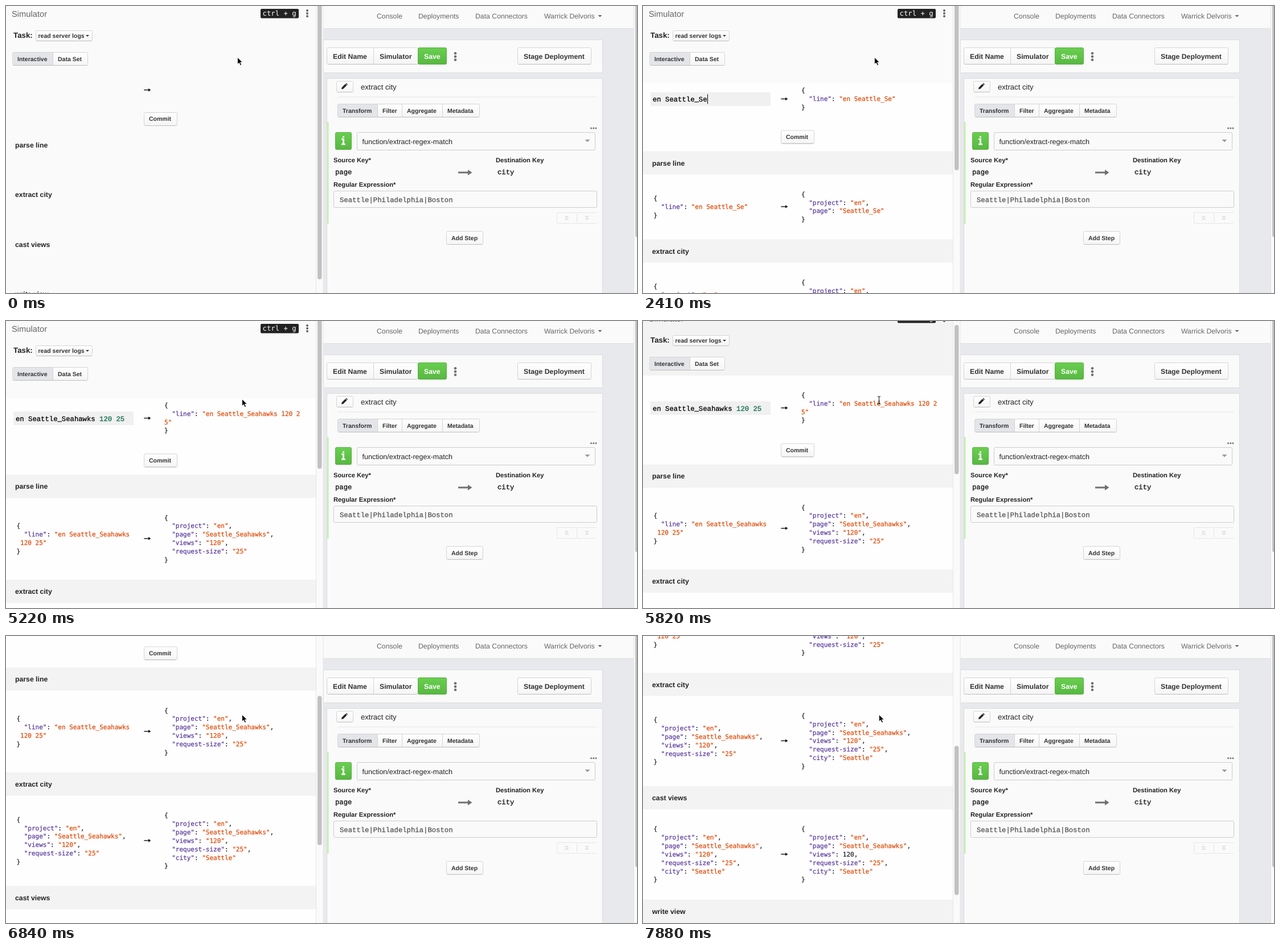
An HTML page for the animation above (8000 ms loop, 1108 by 505 pixels).

```html
<!DOCTYPE html>
<html lang="en">
<head>
<meta charset="utf-8">
<title>Simulator</title>
<style>
html, body { margin: 0; width: 100%; height: 100%; overflow: hidden; background: #fafafa; }
svg { display: block; width: 1108px; height: 505px; }
text { font-family: "Liberation Sans", Arial, sans-serif; white-space: pre; text-rendering: geometricPrecision; }
.b { font-weight: bold; }
.json { font: 11px "DejaVu Sans Mono", Menlo, monospace; stroke-width: .25px; }
.code { font: 12.25px "Liberation Mono", Courier, monospace; stroke-width: .3px; }
</style>
</head>
<body>
<svg id="stage" viewBox="0 0 1108 505">
  <defs>
    <clipPath id="paneClip"><rect width="545" height="505"/></clipPath>
    <linearGradient id="green" x2="0" y2="1">
      <stop stop-color="#69cf50"/><stop offset="1" stop-color="#58b742"/>
    </linearGradient>
    <linearGradient id="plain" x2="0" y2="1">
      <stop stop-color="#fff"/><stop offset="1" stop-color="#f5f5f5"/>
    </linearGradient>
  </defs>
  <g id="page"></g>
  <g id="pane" clip-path="url(#paneClip)"></g>
  <rect x="544.5" y="-1" width="12.5" height="507" fill="#fafafa" stroke="#e6e6e6"/>
  <rect id="thumb" x="547" width="7.5" rx="3.7" fill="#c1c1c1"/>
  <g id="mouse"></g>
</svg>
<script>
const LOOP = 8000, LINE = 14.85, INK = '#222', KEY = '#5b3b9e', STR = '#de4a08';
const $ = id => document.getElementById(id);

// [time, characters typed]
const TYPED = [[0, 0], [150, 1], [320, 2], [770, 3], [920, 4], [1070, 5], [1220, 7], [1370, 9],
  [1670, 10], [1820, 11], [2270, 12], [2410, 13], [2560, 14], [3010, 15], [3160, 16], [3310, 17],
  [3450, 19], [3600, 20], [3900, 21], [4050, 22], [4190, 23], [4630, 24], [4780, 25], [5080, 26]];
// [time, scroll offset]
const SCROLL = [[0, 0], [5370, 2], [5520, 5], [5660, 10], [5810, 18], [5960, 30], [6110, 48],
  [6250, 75], [6400, 108], [6550, 160], [6840, 215], [7140, 245], [7290, 272], [7580, 331], [7880, 390.5]];
const ENTRY = 'en Seattle_Seahawks 120 25';

const stepAt = (table, t) => table.filter(row => row[0] <= t).pop()[1];

const rect = (x, y, w, h, fill, extra = '') =>
  `<rect x="${x}" y="${y}" width="${w}" height="${h}" fill="${fill}" ${extra}/>`;
const text = (x, y, str, size, fill = '#333', cls = '') =>
  `<text x="${x}" y="${y}" font-size="${size}" fill="${fill}" class="${cls}">${str}</text>`;
const path = (d, fill, stroke = 'none', width = 1) =>
  `<path d="${d}" fill="${fill}" stroke="${stroke}" stroke-width="${width}"/>`;
const ink = color => `fill="${color}" stroke="${color}"`;
const mono = (x, y, str, color) =>
  `<text x="${x}" y="${y}" ${ink(color)} class="code">${str}</text>`;
const frame = (x, y, w, h, fill = 'url(#plain)', stroke = '#d4d4d4') =>
  rect(x + .5, y + .5, w, h, fill, `rx="2" stroke="${stroke}"`);
const button = (x, y, w, h) =>
  frame(x, y, w, h) + path(`M${x + 2} ${y + h + .5}h${w - 3}`, 'none', '#bdbdbd');
const caretDown = (x, y, w, fill) => path(`M${x} ${y}h${w}l${-w / 2} ${w / 2}z`, fill);
const dots = (x, y, dx, dy, r, fill) =>
  [-1, 0, 1].map(i => `<circle cx="${x + i * dx}" cy="${y + i * dy}" r="${r}" fill="${fill}"/>`).join('');
const arrow = y => path(`M242.3 ${y}h9`, 'none', '#111', 1.4) + path(`M250 ${y - 2.8}l4.4 2.8l-4.4 2.8z`, '#111');

function drawPage() {
  const label = (x, y, str) => text(x, y, str, 11.2, '#222', 'b');
  const chevrons = (x, y, d) =>
    path(`M${x - 3} ${y}l3 ${-3 * d}l3 ${3 * d}m-6 ${4 * d}l3 ${-3 * d}l3 ${3 * d}`, 'none', '#bbb');
  const tabs = [[591, 'Transform'], [661, 'Filter'], [704, 'Aggregate'], [775, 'Metadata']];
  const nav = [[651, 'Console'], [724, 'Deployments'], [824, 'Data Connectors'], [945, 'Warrick Delvoris']];
  $('page').innerHTML = [
    rect(557, 0, 551, 505, '#e8e9ed'),
    rect(557, 0, 546, 39, '#fafafa'),
    rect(557, 39, 546, 1, '#dfdfe1'),
    ...nav.map(([x, s]) => text(x, 22, s, 12.25, '#666')),
    caretDown(1039.5, 16, 7, '#666'),
    rect(557.5, 59.5, 490, 58, '#fafafa', 'stroke="#dcdcdf"'),
    rect(563.5, 127.5, 484, 400, '#fafafa', 'stroke="#dcdcdf"'),

    button(563, 73, 160, 29),
    rect(645, 74, 1, 28, '#d4d4d4'),
    text(574, 92.5, 'Edit Name', 12.25, '#333', 'b'),
    text(656, 92.5, 'Simulator', 12.25, '#333', 'b'),
    frame(723, 73, 50, 29, 'url(#green)', '#55b041'),
    text(734, 92.5, 'Save', 12.25, '#fff', 'b'),
    dots(789, 89, 0, 5.7, 2.3, '#707070'),
    button(898, 73, 129, 29),
    text(909, 92.5, 'Stage Deployment', 12.25, '#333', 'b'),

    button(580, 132, 29, 19),
    path('M589 146.5l.8-3.2l6.2-6.2l2.5 2.5l-6.2 6.2z', '#222'),
    path('M596.6 136.4l1-.9l2.4 2.4l-.9 1z', '#222'),
    text(623, 147, 'extract city', 13.1, '#222'),
    rect(583, 159.5, 454, 1, '#e8e8e8'),

    button(582, 172, 249, 23),
    rect(583, 173, 69, 22, '#e4e5e8'),
    ...[652, 695, 766].map(x => rect(x, 173, 1, 22, '#d4d4d4')),
    ...tabs.map(([x, s]) => text(x, 187.5, s, 10.5, '#333', 'b')),

    rect(564, 204, 2.7, 179, '#c6f3ae'),
    dots(1031.7, 215, 4.2, 0, 1.6, '#777'),
    frame(578, 222, 28, 30, 'url(#green)', '#55b041'),
    path('M589 233h5v9h2v2.5h-7v-2.5h2v-6.5h-2zM591 229h3v2.8h-3z', '#fff'),
    frame(616, 222, 418, 31, '#fafafa', '#ccc'),
    text(625.5, 242.5, 'function/extract-regex-match', 12.5, '#222'),
    caretDown(1016.5, 235, 9, '#999'),

    label(575, 275, 'Source Key*'),
    label(860, 275, 'Destination Key'),
    mono(578, 295.5, 'page', '#111'),
    mono(863, 295.5, 'city', '#111'),
    path('M794 293h19', 'none', '#707070', 3),
    path('M811 288l7.5 5l-7.5 5z', '#707070'),
    label(575, 317.5, 'Regular Expression*'),
    frame(575, 325, 462, 29, '#fafafa', '#ccc'),
    mono(586, 345, 'Seattle|Philadelphia|Boston', '#555'),

    frame(967, 363, 35, 19, '#fafafa', '#e6e6e6'),
    rect(1003, 363, 34, 1, '#e6e6e6') + rect(1003, 382, 34, 1, '#e6e6e6'),
    chevrons(984.5, 372.5, 1),
    chevrons(1020, 373, -1),
    button(773, 396, 64, 23),
    text(782, 411.8, 'Add Step', 10.5, '#333', 'b'),

    rect(1102.5, -1, 8, 508, '#fafafa', 'stroke="#e2e2e2"'),
    rect(1105, -8, 8, 415, '#c1c1c1', 'rx="3.7"')
  ].join('');
}

// Coloured runs for each line of an object, broken hard after max characters.
function jsonLines(obj, max) {
  const entries = Object.entries(obj);
  const rows = entries.map(([k, v], i) => [
    ['  ', INK], [`"${k}"`, KEY], [': ', INK],
    [JSON.stringify(v), typeof v === 'string' ? STR : INK],
    [i < entries.length - 1 ? ',' : '', INK]]);
  return [[['{', INK]], ...rows, [['}', INK]]].flatMap(row => {
    const chars = row.flatMap(([s, c]) => [...s].map(ch => [ch, c]));
    const lines = [];
    while (chars.length) lines.push(chars.splice(0, max));
    return lines;
  });
}

const jsonText = (lines, x, top) => lines.map((chars, i) => {
  let out = '', last = '';
  for (const [ch, c] of chars) {
    if (c !== last) out += (last && '</tspan>') + `<tspan ${ink(c)}>`;
    out += ch;
    last = c;
  }
  return `<text x="${x}" y="${top + i * LINE + 10.9}" class="json">${out}</tspan></text>`;
}).join('');

// Pipeline results for the typed line: [title, input, output] per step.
function runSteps(line) {
  const parsed = {};
  const names = ['project', 'page', 'views', 'request-size'];
  line.split(' ').filter(Boolean).forEach((w, i) => parsed[names[i]] = w);
  const hit = /Seattle|Philadelphia|Boston/.exec(parsed.page || '');
  const located = { ...parsed, city: hit && hit[0] };
  const cast = { ...located, views: Number(parsed.views) };
  return [
    ['parse line', line && { line }, parsed],
    ['extract city', parsed.page && parsed, located],
    ['cast views', parsed.views && located, cast],
    ['write view']
  ];
}

function thumbEnd(n) {
  if (!n) return 481;
  if (n < 4) return 417;
  if (n < 10) return 364;
  if (n < 21) return 289;
  return n < 25 ? 275 : 260;
}

function drawPane(n, scroll) {
  const line = ENTRY.slice(0, n);
  const pointY = 138 + scroll;
  let overText = false;
  const output = (lines, top) => {
    const row = lines[Math.floor((pointY - top) / LINE)];
    if (row && 278 + row.length * 6.62 > 415) overText = true;
    return jsonText(lines, 278, top);
  };

  const out = [rect(0, 0, 545, 1200, n ? '#fefefe' : '#fafafa')];
  out.push(scroll ? rect(0, 0, 545, 114, '#f3f3f3') : rect(0, 0, 545, 136, '#fafafa'));
  out.push(
    text(10, 19, 'Simulator', 14.7, '#666'),
    rect(447, 5, 67, 16.5, '#222', 'rx="2"'),
    `<text x="450.5" y="17" fill="#fff" style="font:12.25px 'DejaVu Sans Mono',monospace">ctrl + g</text>`,
    dots(529, 13, 0, 5, 2, '#666'),
    text(13, 56, 'Task:', 13.3, '#222', 'b'),
    button(52, 43, 99, 18),
    text(56.5, 56, 'read server logs', 10.5, '#333', 'b'),
    caretDown(140, 51, 6, '#333'),
    button(11, 81, 132, 23),
    rect(11.5, 82, 71, 22, '#e4e5e8'),
    rect(82, 82, 1, 22, '#d4d4d4'),
    text(20, 96.8, 'Interactive', 10.5, '#333', 'b'),
    text(91, 96.8, 'Data Set', 10.5, '#333', 'b'));

  let height = 13;
  if (n) {
    const lines = jsonLines({ line }, 36);
    height = lines.length * LINE;
    const mid = 141 + height / 2;
    const x = 17, digits = line.slice(20);
    out.push(output(lines, 141),
      rect(13, mid - 11.5, 211, 24, '#f0f0f0'),
      mono(x, mid + 5, `${line.slice(0, 20)}<tspan ${ink('#0f6b4c')}>${digits}</tspan>`, '#000'));
    if (n < ENTRY.length) out.push(rect(Math.round(x + n * 7.35), mid - 8, 1, 17, '#000'));
  }
  out.push(arrow(141.2 + height / 2),
    button(242, 174 + height, 58, 23),
    text(251, 189.2 + height, 'Commit', 10.5, '#333', 'b'));

  let y = 211 + height;
  for (const [title, input, result] of runSteps(line)) {
    if (n) out.push(rect(0, y, 545, 41, '#f3f3f3'));
    out.push(text(16, y + 25, title, 12.25, '#222', 'b'));
    y += 41;
    if (!input) {
      y += 46.3;
      continue;
    }
    const left = jsonLines(input, 30), right = jsonLines(result, 36);
    const rows = Math.max(left.length, right.length) * LINE;
    const mid = y + 27.3 + rows / 2;
    out.push(jsonText(left, 18.5, mid - left.length * LINE / 2),
      output(right, mid - right.length * LINE / 2), arrow(mid - .5));
    y += rows + 54.6;
  }
  $('pane').innerHTML = `<g transform="translate(0 ${-scroll})">${out.join('')}</g>`;
  $('thumb').setAttribute('y', scroll ? scroll / 2 - 2 : -4);
  $('thumb').setAttribute('height', scroll ? 262.5 : thumbEnd(n) + 4);
  return overText;
}

function drawMouse(t, overText) {
  const [x, y] = t < 5220 ? [406.5, 90.5] : [414.5, t < 5370 ? 137.5 : 138.5];
  const shape = overText
    ? path('M-2.5 -6q2.5 0 2.5 2q0 -2 2.5 -2M0 -4v9.5M-2.5 7.5q2.5 0 2.5 -2q0 2 2.5 2M-1.5 2.5h3', 'none', '#222', 1.1)
    : path('M0 0V12L2.8 9.4L4.9 14L7 13.1L5 8.6H8.8Z', '#000', '#fff', .8);
  $('mouse').innerHTML = `<g transform="translate(${x} ${y})">${shape}</g>`;
}

let shown = '';
function tick() {
  const t = performance.now() % LOOP;
  const n = stepAt(TYPED, t), scroll = stepAt(SCROLL, t);
  const state = [n, scroll, t < 5220].join();
  if (state !== shown) {
    shown = state;
    drawMouse(t, drawPane(n, scroll));
  }
  requestAnimationFrame(tick);
}

drawPage();
tick();
</script>
</body>
</html>
```
